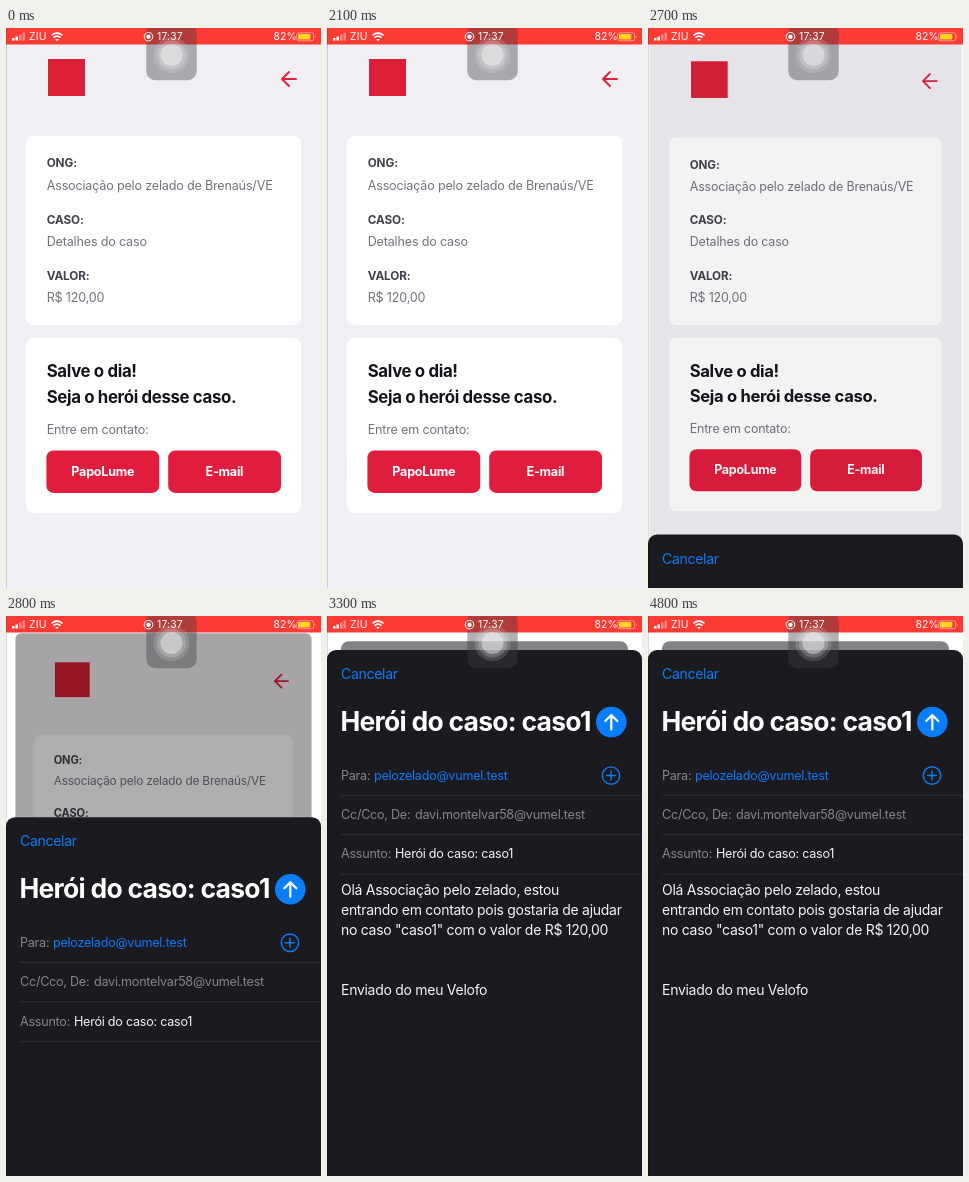
Write an HTML page that moves like this. It is 315 by 560 pixels and loops after 4900 ms.

```html
<!DOCTYPE html>
<html lang="pt">
<head>
<meta charset="utf-8">
<title>Contato por e-mail</title>
<style>
  html, body { margin: 0; width: 100%; height: 100%; overflow: hidden; background: #fff; }
  svg { display: block; width: 315px; height: 560px; }
  text { font: 400 12.6px Inter, "Open Sans", sans-serif; letter-spacing: -.02em; white-space: pre; }
  .label { font-size: 11.76px; font-weight: 700; letter-spacing: -.01em; fill: #41414d; }
  .value { letter-spacing: -.015em; fill: #737380; }
  .hero { font-size: 16.8px; font-weight: 700; fill: #13131a; }
  .action { font-weight: 700; fill: #fff; text-anchor: middle; }
  .status { font-size: 10.4px; fill: #fff; letter-spacing: .015em; }
  .title { font-size: 26.5px; font-weight: 700; letter-spacing: -.028em; fill: #fff; }
  .mail { font-size: 14px; fill: #f4f4f6; }
  .grey { fill: #85858b; }
  .white { fill: #f4f4f6; }
  .blue { fill: #0a7dfa; }
  .line { fill: none; stroke-linecap: round; stroke-linejoin: round; }
</style>
</head>
<body>
<svg viewBox="0 0 315 560">
  <rect width="315" height="560" fill="#fff"/>

  <g id="page">
    <rect id="paper" width="315" height="560" fill="#f1eff3"/>
    <rect x="42" y="31" width="37" height="37" fill="#dc2036"/>
    <path class="line" d="M290 51H276M283 44l-7 7 7 7" stroke="#e02041" stroke-width="1.9"/>
    <rect x="20" y="108" width="275" height="189" rx="7" fill="#fff"/>
    <rect x="20" y="310" width="275" height="175" rx="7" fill="#fff"/>
    <text class="label" x="40.7" y="139.3">ONG:</text>
    <text class="value" x="40.7" y="161.6">Associação pelo zelado de Brenaús/VE</text>
    <text class="label" x="40.7" y="195.6">CASO:</text>
    <text class="value" x="40.7" y="217.8">Detalhes do caso</text>
    <text class="label" x="40.7" y="251.6">VALOR:</text>
    <text class="value" x="40.7" y="274">R$ 120,00</text>
    <text class="hero" x="40.7" y="349.4">Salve o dia!</text>
    <text class="hero" x="40.7" y="374.6">Seja o herói desse caso.</text>
    <text class="value" x="40.7" y="406.2">Entre em contato:</text>
    <rect x="40.4" y="422.4" width="112.8" height="42.5" rx="7" fill="#e11d3d"/>
    <rect x="162.2" y="422.4" width="112.8" height="42.5" rx="7" fill="#e11d3d"/>
    <text class="action" x="96.8" y="447.9">PapoLume</text>
    <text class="action" x="218.4" y="447.9">E-mail</text>
    <rect id="dim" width="315" height="560" fill="#000"/>
  </g>

  <g id="sheet">
    <rect width="315" height="580" rx="9" fill="#1b1a1f"/>
    <text class="mail blue" x="14" y="29">Cancelar</text>
    <text class="title" x="13.5" y="81.2">Herói do caso: caso1</text>
    <circle cx="284.3" cy="72" r="15.3" fill="#0a7dfa"/>
    <path class="line" d="M284.3 79.5V65M278.3 71l6-6 6 6" stroke="#fff" stroke-width="2.2"/>
    <text class="grey" x="14" y="129.5">Para:</text>
    <text class="blue" x="47" y="129.5">pelozelado@vumel.test</text>
    <g class="line" stroke="#0a7dfa" stroke-width="1.4">
      <circle cx="284" cy="125.5" r="8.7"/>
      <path d="M279.5 125.5h9M284 121v9"/>
    </g>
    <text class="grey" x="14" y="168.7">Cc/Cco, De:</text>
    <text class="grey" x="88" y="168.7">davi.montelvar58@vumel.test</text>
    <text class="grey" x="14" y="208.4">Assunto:</text>
    <text class="white" x="68" y="208.4">Herói do caso: caso1</text>
    <path d="M14 145.2H315M14 184.5H315M14 224.2H315" stroke="#323136" stroke-width=".9"/>
    <g id="message">
      <text class="mail" x="14" y="244.5">Olá Associação pelo zelado, estou</text>
      <text class="mail" x="14" y="264.7">entrando em contato pois gostaria de ajudar</text>
      <text class="mail" x="14" y="285">no caso "caso1" com o valor de R$ 120,00</text>
      <text class="mail" x="14" y="345">Enviado do meu Velofo</text>
    </g>
  </g>

  <rect width="315" height="16.5" fill="#fd3b35"/>
  <rect x="140.3" y="-4" width="50.4" height="56.2" rx="9" fill="#3c3c41" fill-opacity=".4"/>
  <g fill="#fff">
    <circle cx="165.5" cy="27" r="18" fill-opacity=".14"/>
    <circle cx="165.5" cy="27" r="14.5" fill-opacity=".2"/>
    <circle cx="165.5" cy="27" r="11" fill-opacity=".4"/>
  </g>

  <g fill="#fff">
    <path d="M6 10h2.5v2.5H6zM9.5 8.5H12v4H9.5z"/>
    <path d="M13 6.5h2.5v6H13zM16.5 4.5H19v8h-2.5z" fill-opacity=".4"/>
    <text class="status" x="23" y="12.3">ZIU</text>
    <path d="M45.5 7.3q5.5-4.6 11 0M47.5 9.7q3.5-3 7 0" fill="none" stroke="#fff" stroke-width="1.7"/>
    <path d="M49.2 11.3q1.8-1.3 3.6 0L51 13.2z"/>
    <circle cx="142.5" cy="8.7" r="4.3" fill="none" stroke="#fff"/>
    <circle cx="142.5" cy="8.7" r="2.2"/>
    <text class="status" x="151" y="12.3">17:37</text>
    <text class="status" x="267.5" y="12.3">82%</text>
    <rect x="290.7" y="4.8" width="17" height="8" rx="2.3" fill="none" stroke="#fff" stroke-opacity=".55" stroke-width=".9"/>
    <rect x="292" y="6" width="12.3" height="5.6" rx="1.2" fill="#ffd51f"/>
    <path d="M308.9 7.3q1.6 1.5 0 3z" fill-opacity=".55"/>
  </g>
  <path d="M.25 0V560" stroke="#000" stroke-opacity=".4" stroke-width=".5"/>
</svg>
<script>
  const LOOP = 4900, STEP = 100;
  const OPEN = 2670.5, MESSAGE = 2900;
  const STIFFNESS = 0.0182;
  const SHEET_TOP = 34, HEIGHT = 560, WIDTH = 315;
  const [page, paper, dim, sheet, message] =
    ['page', 'paper', 'dim', 'sheet', 'message'].map(id => document.getElementById(id));

  // Critically damped spring from 0 to 1
  function spring(ms) {
    const x = STIFFNESS * Math.max(0, ms);
    return 1 - (1 + x) * Math.exp(-x);
  }

  function draw(time) {
    const t = Math.floor((time % LOOP) / STEP) * STEP;
    const p = spring(t - OPEN);
    const scale = 1 - 0.088 * p;
    const left = WIDTH * (1 - scale) / 2;
    page.setAttribute('transform', `translate(${left} ${25.2 * p}) scale(${scale})`);
    for (const box of [paper, dim]) box.setAttribute('rx', 9 * p);
    dim.setAttribute('opacity', 0.46 * p);
    sheet.setAttribute('transform', `translate(0 ${HEIGHT + (SHEET_TOP - HEIGHT) * p})`);
    message.setAttribute('visibility', t >= MESSAGE ? 'visible' : 'hidden');
  }

  const start = performance.now();
  function tick() {
    draw(performance.now() - start);
    requestAnimationFrame(tick);
  }
  tick();
</script>
</body>
</html>
```
